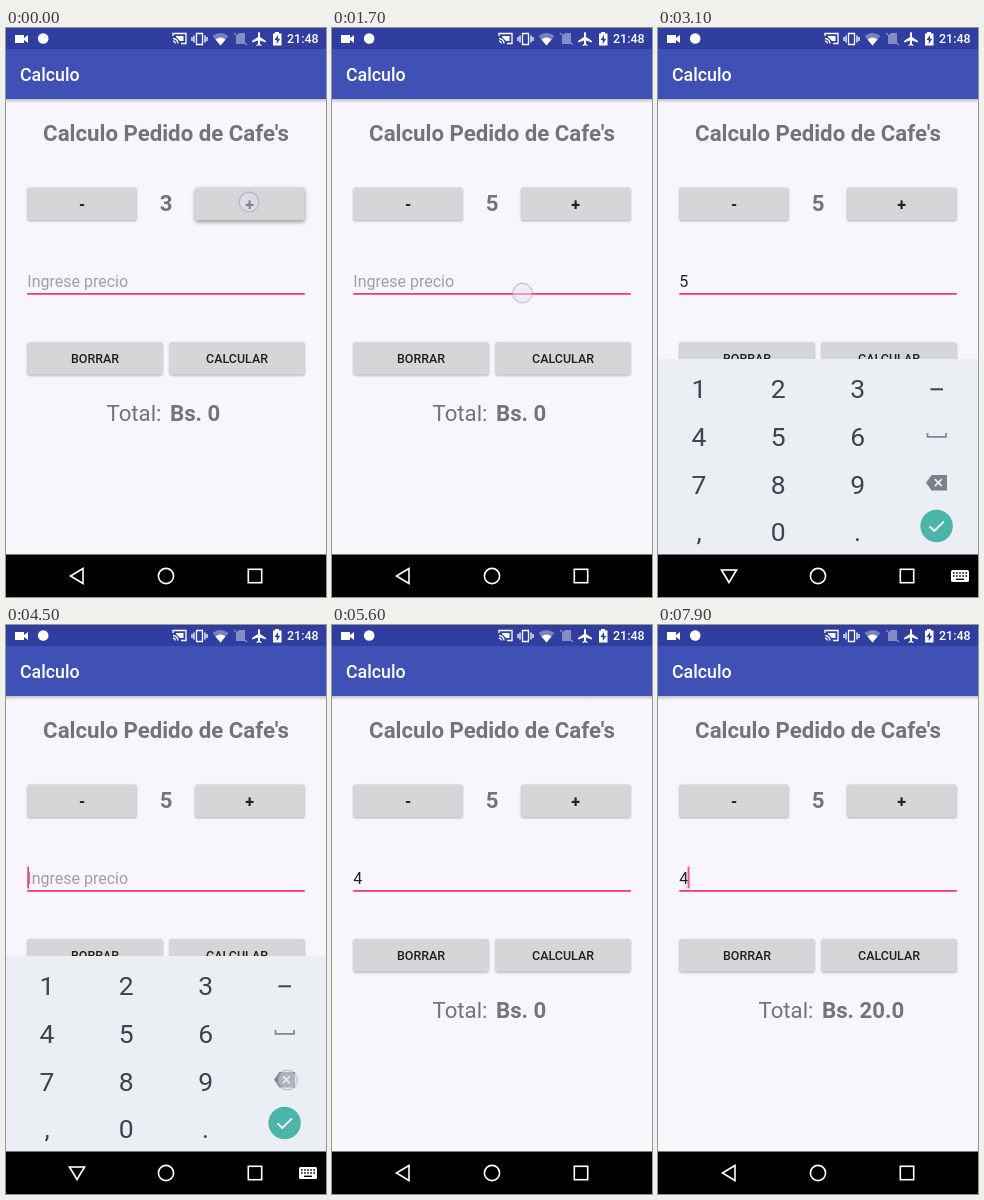
An HTML page that plays this animation: 320x569 px, repeating every 8 s.

```html
<!DOCTYPE html>
<html lang="es">
<head>
<meta charset="utf-8">
<title>Calculo</title>
<style>
html, body { margin: 0; width: 100%; height: 100%; overflow: hidden; background: #f8f6fa; }
svg { display: block; width: 100%; height: 100%; font-family: Roboto, sans-serif; }
.mid { text-anchor: middle; }
.big { font-size: 22.22px; fill: #747377; }
.bold { font-weight: 700; }
.field { font-size: 16px; }
.button rect { fill: #d5d6d7; filter: drop-shadow(0 1px 1px rgba(0,0,0,.32)); }
.button text { font-size: 12.44px; font-weight: 500; fill: #202021; text-anchor: middle; }
.button .sign { font-size: 16px; font-weight: 700; }
.keys { font-size: 26.5px; fill: #37474f; text-anchor: middle; }
.line { fill: none; stroke: #fff; stroke-width: 1.6; }
.status { fill: #fff; }

/* One loop is 8 s, so 100 ms is 1.25% */
.anim { animation: 8s step-end infinite; }
@keyframes three { 0% { opacity: 1 } 1.25%, 100% { opacity: 0 } }
@keyframes four { 0% { opacity: 0 } 1.25% { opacity: 1 } 7.5%, 100% { opacity: 0 } }
@keyframes five { 0% { opacity: 0 } 7.5%, 100% { opacity: 1 } }
@keyframes hint { 0%, 55% { opacity: 1 } 32.5%, 61.25%, 100% { opacity: 0 } }
@keyframes price5 { 0%, 55%, 100% { opacity: 0 } 32.5% { opacity: 1 } }
@keyframes price4 { 0% { opacity: 0 } 61.25%, 100% { opacity: 1 } }
@keyframes before { 0% { opacity: 1 } 80%, 100% { opacity: 0 } }
@keyframes after { 0% { opacity: 0 } 80%, 100% { opacity: 1 } }
@keyframes blink {
  0%, 8.75%, 21.25%, 38.75%, 51.25%, 67.5%, 80%, 92.5% { opacity: 0 }
  2.5%, 15%, 27.5%, 32.5%, 45%, 55%, 61.25%, 73.75%, 86.25%, 98.75%, 100% { opacity: 1 }
}
@keyframes caret {
  0%, 55% { transform: none }
  32.5%, 61.25%, 100% { transform: translateX(8.5px) }
}
@keyframes touch {
  0%, 5% { transform: translate(243px, 174px); opacity: 1 }
  1.25%, 7.5%, 22.5%, 33.75%, 57.5%, 62.5%, 68.75%, 80%, 100% { opacity: 0; transform: none }
  21.25% { transform: translate(190.5px, 265px); opacity: 1 }
  32.5% { transform: translate(124px, 409px); opacity: 1 }
  55% { transform: translate(281.5px, 455px); opacity: 1 }
  61.25% { transform: translate(41px, 409px); opacity: 1 }
  66.25% { transform: translate(58px, 553px); opacity: 1 }
  78.75% { transform: translate(231px, 331px); opacity: 1 }
}
@keyframes pressPlus {
  0%, 5% { filter: drop-shadow(0 2px 2px rgba(0,0,0,.4)) }
  2.5%, 8.75%, 100% { filter: drop-shadow(0 1px 1px rgba(0,0,0,.32)) }
}
@keyframes pressSum {
  0%, 81.25%, 100% { filter: drop-shadow(0 1px 1px rgba(0,0,0,.32)) }
  78.75% { filter: drop-shadow(0 2px 2px rgba(0,0,0,.4)) }
}
@keyframes keyboard {
  0% { opacity: 0; transform: translateY(39px) }
  25% { opacity: .55; transform: translateY(18px) }
  26.25% { opacity: .9; transform: translateY(4px) }
  27.5% { opacity: 1; transform: none }
  67.5% { opacity: .95; transform: none }
  68.75% { opacity: .45; transform: translateY(8px) }
  70%, 100% { opacity: 0; transform: translateY(20px) }
}
@keyframes turn {
  0%, 67.5%, 100% { transform: none }
  25% { transform: rotate(-45deg) }
  26.25% { transform: rotate(-90deg) }
}
@keyframes switcher { 0%, 67.5%, 100% { opacity: 0 } 26.25% { opacity: 1 } }
@keyframes ripple {
  0%, 70%, 100% { opacity: 0; transform: none }
  66.25% { opacity: .7; transform: scaleX(.7) }
  67.5% { opacity: 1; transform: none }
  68.75% { opacity: .5; transform: none }
}
</style>
</head>
<body>
<svg viewBox="0 0 320 569" preserveAspectRatio="none">
  <defs>
    <linearGradient id="shade" x2="0" y2="1">
      <stop stop-color="#000" stop-opacity=".22"/>
      <stop offset="1" stop-color="#000" stop-opacity="0"/>
    </linearGradient>
  </defs>
  <rect width="320" height="569" fill="#f8f6fa"/>

  <rect y="71" width="320" height="4" fill="url(#shade)"/>
  <rect y="21" width="320" height="50" fill="#3f51b5"/>
  <rect width="320" height="21" fill="#303f9f"/>
  <text x="14" y="53" font-size="17.78" font-weight="500" fill="#fff">Calculo</text>

  <g class="status">
    <path d="M9 7h9v3l4-3v8l-4-3v3h-9z"/>
    <circle cx="37.2" cy="10.5" r="5.3"/>
    <path class="line" stroke-width="1.3" style="stroke-width:1.3" d="M167 8V5.500h13v10h-5M167 10.500a5 5 0 0 1 5 5M167 13a3 3 0 0 1 2.500 2.500"/>
    <path d="M170 8h7.500v5h-3.500l-4-4z"/>
    <path class="line" style="stroke-width:1.3" d="M190.500 5.500h6v11h-6zM188 7.500v7M199 7.500v7M186 9v4M201 9v4"/>
    <path opacity=".35" d="M206.500 8Q214.500 2 222.500 8L214.500 17.500z"/>
    <path d="M209.500 11.500Q214.500 7.500 219.500 11.500L214.500 17.500z"/>
    <g opacity=".4">
      <path d="M233 5h6v11h-9V8z"/>
      <path class="line" style="stroke-width:1.2" d="M228 5l13 12"/>
    </g>
    <path d="M252 5q1-2 2 0v4l6 4v1.500l-6-2v3.500l1.500 1v1l-2.500-.7-2.500.7v-1l1.500-1v-3.500l-6 2V13l6-4z"/>
    <path d="M267 5.500h2V4h4v1.500h2.500V17.500H267z"/>
    <path fill="#303f9f" d="M272 7l-3.500 5h2.200v4l3.500-5.300H272z"/>
    <text x="281" y="15" font-size="12.44" font-weight="500">21:48</text>
  </g>

  <text class="big bold mid" x="160" y="112.500">Calculo Pedido de Cafe's</text>

  <g class="button">
    <rect x="21.500" y="159.500" width="109" height="32.500" rx="1.800"/>
    <text class="sign" x="76" y="181.500">-</text>
  </g>
  <g class="button">
    <rect class="anim" style="animation-name:pressPlus" x="189.300" y="159.500" width="109.200" height="32.500" rx="1.800"/>
    <text class="sign" x="243.700" y="181.500">+</text>
  </g>
  <g class="big bold mid">
    <text class="anim" style="animation-name:three" x="160" y="183">3</text>
    <text class="anim" style="animation-name:four" x="160" y="183">4</text>
    <text class="anim" style="animation-name:five" x="160" y="183">5</text>
  </g>

  <g class="field" fill="#212122">
    <text class="anim" style="animation-name:hint" x="21.300" y="259" fill="#a09fa2">Ingrese precio</text>
    <text class="anim" style="animation-name:price5" x="21.300" y="259">5</text>
    <text class="anim" style="animation-name:price4" x="21.300" y="259">4</text>
  </g>
  <rect x="21.300" y="265" width="277.500" height="1.800" fill="#f03c7c"/>
  <g class="anim" style="animation-name:caret">
    <rect class="anim" style="animation-name:blink" x="21.300" y="241.500" width="1.700" height="22" fill="#f03c7c"/>
  </g>

  <g class="button">
    <rect x="21.500" y="314" width="135" height="32.500" rx="1.800"/>
    <text x="89" y="334.700">BORRAR</text>
  </g>
  <g class="button">
    <rect class="anim" style="animation-name:pressSum" x="163.700" y="314" width="134.800" height="32.500" rx="1.800"/>
    <text x="231" y="334.700">CALCULAR</text>
  </g>

  <g class="big">
    <text x="100.500" y="392.500">Total:</text>
    <g class="bold">
      <text class="anim" style="animation-name:before" x="164" y="392.500">Bs. 0</text>
      <text class="anim" style="animation-name:after" x="164" y="392.500">Bs. 20.0</text>
    </g>
  </g>

  <g class="anim" style="animation-name:keyboard">
    <rect y="331" width="320" height="196" fill="#ebeef2"/>
    <g class="keys" id="keys"></g>
    <rect x="272.500" y="360.300" width="12.500" height="2" fill="#37474f"/>
    <path d="M269.500 405v3.800h18.500V405" fill="none" stroke="#7d878d" stroke-width="1.700"/>
    <path d="M268 454.700l5.500-7.700h15.500v15.500h-15.500z" fill="#788288"/>
    <path d="M276.800 451.200l7 7m0-7l-7 7" stroke="#ebeef2" stroke-width="1.700"/>
    <circle cx="278.600" cy="498" r="16.200" fill="#4bb5aa"/>
    <path d="M271.500 498.300l4.800 4.700 9.700-9.700" fill="none" stroke="#fff" stroke-width="1.800"/>
  </g>

  <rect y="526.500" width="320" height="42.500" fill="#000"/>
  <rect class="anim" style="animation-name:ripple;transform-origin:71px 548px" x="24" y="527" width="95" height="42" rx="21" fill="#222"/>
  <path class="line anim" style="animation-name:turn;transform-origin:71px 548px" d="M64.500 548l12.500-7.500v15z"/>
  <circle class="line" cx="160" cy="548" r="7.600"/>
  <rect class="line" x="242.300" y="541.300" width="13.400" height="13.400"/>
  <g class="anim" style="animation-name:switcher">
    <rect x="293" y="542" width="18" height="12" rx="1.500" fill="#fff"/>
    <path d="M295 545h14M295 548h14" stroke="#000" stroke-width="1.500" stroke-dasharray="1.600 1.500"/>
    <path d="M298 551.300h8" stroke="#000" stroke-width="1.400"/>
  </g>

  <circle class="anim" style="animation-name:touch" r="9.800" fill="#e3e4f0" fill-opacity=".5" stroke="#8795b8" stroke-opacity=".5" stroke-width="1.200"/>
</svg>
<script>
const keys = document.getElementById('keys');
[...'123456789,0.'].forEach((label, i) => {
  const key = document.createElementNS(keys.namespaceURI, 'text');
  key.setAttribute('x', 41 + (i % 3) * 79.3);
  key.setAttribute('y', 370.3 + Math.floor(i / 3) * 47.6);
  key.textContent = label;
  keys.append(key);
});
</script>
</body>
</html>
```
